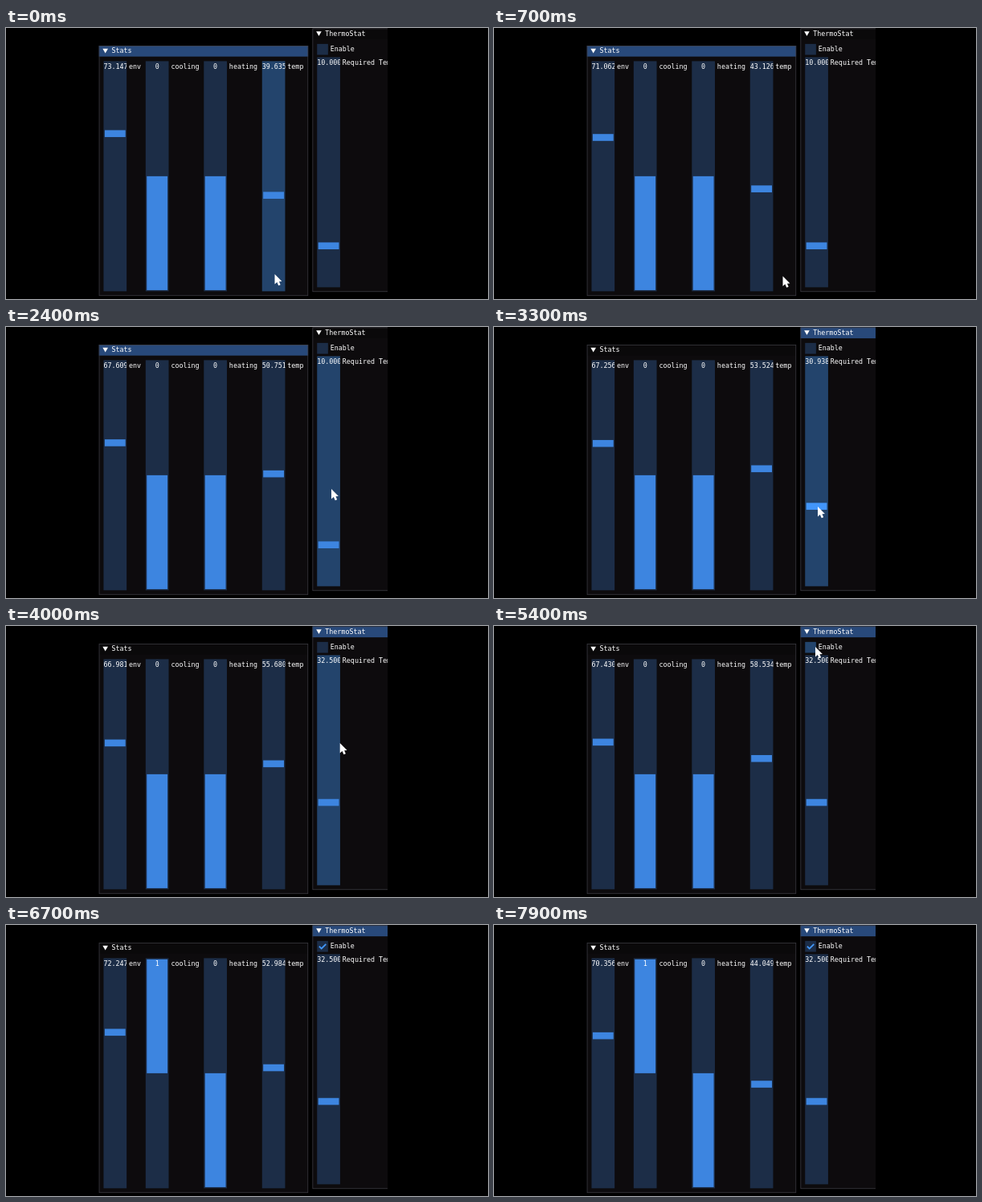
An HTML page with a canvas that plays this animation: 600x338 px, repeating every 8000 ms.

```html
<!DOCTYPE html>
<html lang="en">
<head>
<meta charset="utf-8">
<title>Thermostat panels</title>
<style>
html, body { margin: 0; width: 100%; height: 100%; overflow: hidden; background: #000; }
canvas { display: block; width: 600px; height: 338px; }
</style>
</head>
<body>
<canvas id="stage"></canvas>
<script>
const canvas = document.getElementById('stage');
const ctx = canvas.getContext('2d');
const dpr = window.devicePixelRatio || 1;
canvas.width = 600 * dpr;
canvas.height = 338 * dpr;

const LOOP = 8000, STEP = 100;
const S = 0.7175;               // stage pixels per interface unit
const MIN = -10, MAX = 110;     // temperature slider range
const BAR_W = 40, BAR_H = 400, GRAB = 12, CHAR = 7;
const FONT = '11.63px "DejaVu Sans Mono", monospace';
const PRESS = 3000, RELEASE = 3400, CLICK = 5950;

const COLOR = {
  window: '#0d0b0d', border: '#3e3e45', frame: '#1c2d47', hover: '#23446c',
  title: '#28497a', titleOff: '#0a090a', grab: '#3d85e0', active: '#4296fa', text: '#fff'
};

// Readings: [ms, env, temp]; cooling starts at CLICK
const READINGS = [
  [0, 73.147, 39.635], [1600, 68.381, 47.615], [2400, 67.609, 50.751], [4000, 66.981, 55.68],
  [5400, 67.43, 58.534], [CLICK, 68.87, 59.55], [6700, 72.247, 52.984], [7900, 70.356, 44.049]
];

// Pointer moves: [start ms, x, y], each eased over MOVE ms
const MOVE = 300, START = [334.5, 307];
const MOVES = [
  [200, 359.5, 309.5], [1900, 405, 202], [2650, 403, 271.8], [3050, 403, 220.1],
  [3700, 415.7, 146], [4000, 452, 5], [4300, 459, 28], [4850, 400, 26],
  [6000, 443.5, 26], [6300, 380, 400]
];

const clamp01 = u => Math.min(1, Math.max(0, u));
const lerp = (a, b, u) => a + (b - a) * u;
const ease = u => u * u * (3 - 2 * u);

function readings(t) {
  const i = Math.max(1, READINGS.findIndex(r => r[0] >= t));
  const a = READINGS[i - 1], b = READINGS[i];
  const u = (t - a[0]) / (b[0] - a[0]);
  return [lerp(a[1], b[1], u), lerp(a[2], b[2], u)];
}

function pointerAt(t) {
  return MOVES.reduce(([x, y], [start, nx, ny]) => {
    const u = ease(clamp01((t - start) / MOVE));
    return [lerp(x, nx, u), lerp(y, ny, u)];
  }, START);
}

function box(x, y, w, h, color) {
  ctx.fillStyle = color;
  ctx.fillRect(x, y, w, h);
}

// (x, y) is the top left of the text line
function text(str, x, y) {
  ctx.fillStyle = COLOR.text;
  ctx.fillText(str, x, y + 10);
}

function poly(points, color) {
  ctx.beginPath();
  points.forEach(([x, y]) => ctx.lineTo(x, y));
  ctx.closePath();
  ctx.fillStyle = color;
  ctx.fill();
}

function clipped(x, y, w, h, paint) {
  ctx.save();
  ctx.beginPath();
  ctx.rect(x, y, w, h);
  ctx.clip();
  paint();
  ctx.restore();
}

// paint receives a hit test in panel units
function panel(px, py, w, h, title, focused, mouse, paint) {
  const mx = (mouse[0] - px) / S, my = (mouse[1] - py) / S;
  const over = (x, y, bw, bh) => mx >= x && mx < x + bw && my >= y && my < y + bh;
  ctx.save();
  ctx.translate(px, py);
  ctx.scale(S, S);
  box(0, 0, w, h, COLOR.window);
  box(0, 0, w, 19, focused ? COLOR.title : COLOR.titleOff);
  ctx.strokeStyle = COLOR.border;
  ctx.lineWidth = 1;
  ctx.strokeRect(0.5, 0.5, w - 1, h - 1);
  poly([[6.5, 5.4], [15.7, 5.4], [11.1, 13.3]], COLOR.text);
  text(title, 22, 3);
  paint(over);
  ctx.restore();
}

function slider(x, y, label, shown, ratio, size, hovered, held) {
  box(x, y, BAR_W, BAR_H, hovered || held ? COLOR.hover : COLOR.frame);
  const top = y + 2 + (BAR_H - 4 - size) * (1 - ratio);
  box(x + 2, top, BAR_W - 4, size, held ? COLOR.active : COLOR.grab);
  const inset = Math.max(0, (BAR_W - shown.length * CHAR) / 2);
  clipped(x, y, BAR_W, BAR_H, () => text(shown, x + inset, y + 3));
  text(label, x + BAR_W + 4, y + 3);
}

function checkbox(x, y, label, on, hovered) {
  box(x, y, 19, 19, hovered ? COLOR.hover : COLOR.frame);
  if (on) {
    ctx.strokeStyle = COLOR.active;
    ctx.lineWidth = 2.6;
    ctx.beginPath();
    ctx.moveTo(x + 3.7, y + 9.5);
    ctx.lineTo(x + 7.6, y + 13.4);
    ctx.lineTo(x + 15.4, y + 5.6);
    ctx.stroke();
  }
  text(label, x + 23, y + 3);
}

function pointer([x, y]) {
  ctx.save();
  ctx.translate(x, y);
  ctx.scale(S, S);
  poly([[0, 0], [0, 17.5], [4, 14], [6.6, 20], [10, 18.6], [7.6, 13], [12.4, 12.6]], '#fff');
  ctx.restore();
}

const ratioOf = v => (v - MIN) / (MAX - MIN);

function required(t, mouseY, top) {
  if (t < PRESS) return 10;
  if (t >= RELEASE) return 32.5;
  const bottom = top + (50 + BAR_H - 2 - GRAB / 2) * S;
  const steps = Math.round((bottom - mouseY) / S);
  return MIN + steps * (MAX - MIN) / (BAR_H - 4 - GRAB);
}

function draw(t) {
  const mouse = pointerAt(t);
  const [env, temp] = readings(t);
  const rightTop = 0.5;
  const need = required(t, mouse[1], rightTop);
  const enabled = t >= CLICK, cooling = Number(enabled);
  const focusRight = t >= PRESS;
  const held = focusRight && t < RELEASE;

  ctx.setTransform(dpr, 0, 0, dpr, 0, 0);
  box(0, 0, 600, 338, '#000');
  ctx.font = FONT;

  panel(115.7, 22, 363, 435, 'Stats', !focusRight, mouse, over => {
    const bars = [
      ['env', env.toFixed(3), ratioOf(env), GRAB],
      ['cooling', String(cooling), cooling, 198],
      ['heating', '0', 0, 198],
      ['temp', temp.toFixed(3), ratioOf(temp), GRAB]
    ];
    let x = 8;
    for (const [label, shown, ratio, size] of bars) {
      slider(x, 27, label, shown, ratio, size, over(x, 27, BAR_W, BAR_H), false);
      x += BAR_W + 4 + label.length * CHAR + 8;
    }
  });

  clipped(0, 0, 475, 338, () => {
    panel(381.5, rightTop, 200, 458, 'ThermoStat', focusRight, mouse, over => {
      checkbox(8, 27, 'Enable', enabled, over(8, 27, 65, 19));
      slider(8, 50, 'Required Temperature', need.toFixed(3), ratioOf(need), GRAB,
        over(8, 50, BAR_W, BAR_H), held);
    });
  });

  pointer(mouse);
}

function tick() {
  const t = performance.now() % LOOP;
  draw(Math.floor(t / STEP) * STEP);
  requestAnimationFrame(tick);
}
tick();
</script>
</body>
</html>
```
